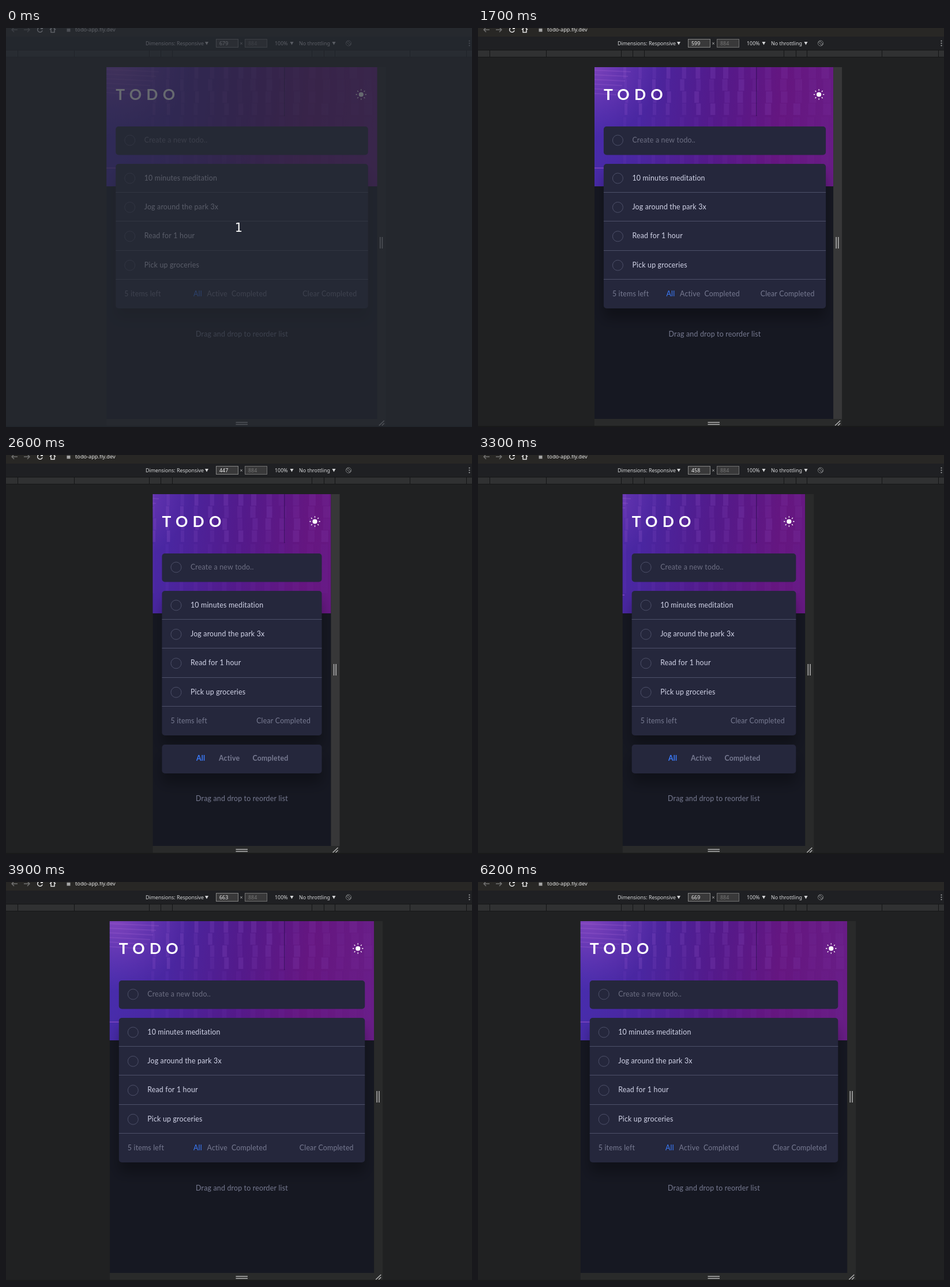
These frames come from a looping animation (808x693 px, 6.8 s). An HTML page with a canvas:

```html
<!DOCTYPE html>
<html lang="en">
<head>
<meta charset="utf-8">
<title>Todo app</title>
<style>
  html, body { margin: 0; width: 100%; height: 100%; overflow: hidden; background: #202122; }
  canvas { display: block; }
</style>
</head>
<body>
<canvas id="stage" width="808" height="693"></canvas>
<script>
const ctx = document.getElementById('stage').getContext('2d');
const LOOP = 6800, STEP = 100, SCALE = 0.6915, MID = 409;
const TOP = 68, BOTTOM = 679;
const UI = '"Noto Sans", sans-serif', APP = 'Lato, sans-serif';
const CARD = '#25273c', LINE = '#4d5069', DIM = '#777a91', TEXT = '#d2d4e8';

// Eased drags of the viewport width in css pixels
const START_WIDTH = 679;
const drags = [
  { start: 1270, time: 1075, to: 447 },
  { start: 3200, time: 700, to: 663 },
  { start: 3900, time: 100, to: 665 },
  { start: 4800, time: 200, to: 669 }
];
const ease = p => (1 - Math.cos(Math.PI * Math.min(1, Math.max(0, p)))) / 2;
const widthAt = t => Math.round(drags.reduce(
  (width, { start, time, to }) => width + (to - width) * ease((t - start) / time), START_WIDTH));

function seeded(seed) {
  return () => (seed = seed * 16807 % 2147483647) / 2147483647;
}

function rect(x, y, w, h, color) {
  ctx.fillStyle = color;
  ctx.fillRect(x, y, w, h);
}

function text(str, x, y, color, font, { align = 'left', gap = 0 } = {}) {
  ctx.font = font;
  ctx.fillStyle = color;
  ctx.textAlign = align;
  ctx.letterSpacing = gap + 'px';
  ctx.fillText(str, x, y);
}

const label = (str, x, y, color, align, weight = 400) =>
  text(str, x, y, color, `${weight} 12.4px ${APP}`, { align, gap: 0.18 });

// Each path is a flat list: x, y, x, y, ...
function lines(color, width, ...paths) {
  ctx.strokeStyle = color;
  ctx.lineWidth = width;
  ctx.beginPath();
  for (const p of paths) {
    ctx.moveTo(p[0], p[1]);
    for (let i = 2; i < p.length; i += 2) ctx.lineTo(p[i], p[i + 1]);
  }
  ctx.stroke();
}

function disc(x, y, r, color) {
  ctx.fillStyle = color;
  ctx.beginPath();
  ctx.arc(x, y, r, 0, 7);
  ctx.fill();
}

function ring(x, y, r, color, width = 1, from = 0, to = Math.PI * 2) {
  ctx.strokeStyle = color;
  ctx.lineWidth = width;
  ctx.beginPath();
  ctx.arc(x, y, r, from, to);
  ctx.stroke();
}

function card(x, y, w, h, shadow) {
  ctx.save();
  if (shadow) {
    ctx.shadowColor = 'rgba(0,0,0,.3)';
    ctx.shadowBlur = 22;
    ctx.shadowOffsetY = 18;
  }
  ctx.fillStyle = CARD;
  ctx.beginPath();
  ctx.roundRect(x, y, w, h, 5);
  ctx.fill();
  ctx.restore();
}

function browserBar() {
  const ink = '#e4e4e4';
  rect(0, 0, 808, 15, '#282725');
  lines('#737373', 1.4, [20, 3, 10, 3], [14, -1, 10, 3, 14, 7], [31, 3, 41, 3], [37, -1, 41, 3, 37, 7]);
  ring(59, 3, 4.3, ink, 1.5, 0.3, 5.4);
  rect(60, -1, 4, 3, ink);
  lines(ink, 1.5, [76, 3, 81, -2, 86, 3], [78, 2, 78, 7.5, 84, 7.5, 84, 2]);
  rect(105.5, 1, 6, 5.5, '#a5a5a5');
  text('todo-app.fly.dev', 120, 6, '#e6e6e6', '9.2px ' + UI);
}

function field(x, value, border, color) {
  rect(x, 19, 39, 15, border);
  rect(x + 1, 20, 37, 13, '#39393a');
  text(value, x + 6, 30, color, '8.9px ' + UI);
}

function menu(str, x, arrowX) {
  const ink = '#d6d7d9';
  text(str, x, 30, ink, '8.9px ' + UI);
  ctx.beginPath();
  ctx.moveTo(arrowX - 3, 24);
  ctx.lineTo(arrowX + 3, 24);
  ctx.lineTo(arrowX, 29.5);
  ctx.fill();
}

function deviceBar(width) {
  rect(0, 15, 808, 23, '#1f2023');
  menu('Dimensions: Responsive', 242, 348);
  menu('100%', 466, 495.5);
  menu('No throttling', 508, 568.5);
  field(364, width, '#858585', '#ececec');
  field(414, 884, '#707070', '#757575');
  text('×', 405.5, 30, '#b5b5b5', '8.9px ' + UI);
  ring(594, 26.5, 4.6, '#77797b');
  lines('#8a8c8e', 1, [590.5, 24.5, 592.5, 22.5, 598, 28, 596, 30, 590.5, 24.5]);
  for (const y of [22.5, 26.5, 30.5]) disc(803.5, y, 1.1, '#a5a7a9');

  rect(0, 38, 808, 13, '#161718');
  rect(0, 39, 808, 11, '#303132');
  for (const d of [121, 141.5, 161, 291, 389]) {
    rect(Math.round(MID - d), 39, 1, 11, '#131415');
    rect(Math.round(MID + d), 39, 1, 11, '#131415');
  }
}

function gradient(x0, y0, x1, y1, colors) {
  const g = ctx.createLinearGradient(x0, y0, x1, y1);
  colors.forEach((c, i) => g.addColorStop(i / (colors.length - 1), c));
  return g;
}

// The photo stays centred, so resizing only crops it.
function photo() {
  const random = seeded(11);
  rect(170, TOP, 480, 207, gradient(174, 90, 644, 150, ['#472eae', '#4a26a0', '#531a8b', '#651680', '#681d86']));
  const glow = ctx.createRadialGradient(190, 60, 0, 190, 60, 130);
  glow.addColorStop(0, 'rgba(190,95,205,.5)');
  glow.addColorStop(1, 'rgba(150,70,200,0)');
  rect(170, TOP, 240, 207, glow);

  // Window columns that widen and fade to the right, with faint reflections
  for (let i = 0; i < 16; i++) {
    const x = 252 + i * 24.5, w = 5 + i * 0.6, alpha = 0.3 - i * 0.014;
    for (let y = TOP; y < 150; y += 21)
      rect(x + random() * 4, y, w, 20, `rgba(150,90,205,${alpha * (0.4 + random() * 0.6)})`);
    rect(x, 155, w, 85, `rgba(130,70,200,${alpha * 0.35})`);
  }
  for (let i = 0; i < 6; i++)
    lines('rgba(200,130,225,.15)', 2, [174, 72 + i * 8, 265 - i * 5, 76 + i * 8]);
  rect(482, TOP, 1.5, 85, 'rgba(35,8,75,.5)');
  rect(174, 242.5, 80, 1.5, 'rgba(175,95,215,.55)');
}

function sun(x, y) {
  disc(x, y, 4.1, '#fff');
  for (let i = 0; i < 8; i++) {
    const c = Math.cos(i * Math.PI / 4), s = Math.sin(i * Math.PI / 4);
    lines('#fff', 1.3, [x + c * 6.8, y + s * 6.8, x + c * 9.2, y + s * 9.2]);
  }
}

function app(left, width) {
  const right = left + width, mid = left + width / 2;
  const x = left + 16, w = width - 32;
  const wide = width / SCALE >= 600;

  text('TODO', x, 125, '#fff', `700 26.5px ${APP}`, { gap: 8.2 });
  sun(right - 28, 115.5);

  card(x, 171, w, 49.5);
  ring(left + 40.5, 195, 9, LINE);
  label('Create a new todo..', left + 65.5, 199, '#6d6f83');

  card(x, 236, w, 251, true);
  ['10 minutes meditation', 'Jog around the park 3x', 'Read for 1 hour', 'Pick up groceries'].forEach((item, i) => {
    const y = 261 + i * 50.4;
    ring(left + 40.5, y, 9, LINE);
    label(item, left + 65.5, y + 3.5, TEXT);
    rect(x, Math.floor(285.5 + i * 50.4), w, 1, LINE);
  });
  label('5 items left', left + 31, 466, DIM);
  label('Clear Completed', right - 35.5, 466, DIM, 'right');

  if (!wide) card(x, 503, w, 50, true);
  const offsets = wide ? [-84, -60.5, -18] : [-79, -40, 18.5];
  ['All', 'Active', 'Completed'].forEach((name, i) =>
    label(name, mid + offsets[i], wide ? 466 : 531, i ? DIM : '#3b7cfd', 'left', wide ? 400 : 700));
  label('Drag and drop to reorder list', mid, wide ? 536 : 601, DIM, 'center');
}

function resizers(left, right, dragging) {
  const grip = '#b4b4b4';
  rect(left, BOTTOM, right - left + 15, 12, '#292a2a');
  rect(right, TOP, 15, BOTTOM - TOP, dragging ? '#373738' : '#292a2a');
  lines(grip, 1.5, [right + 5, 363, right + 5, 383], [right + 8.7, 363, right + 8.7, 383],
    [398.5, 685, 419, 685], [398.5, 688.5, 419, 688.5],
    [right + 3, 690.5, right + 12, 682], [right + 8, 690.5, right + 12, 686.5]);
}

function draw(t) {
  const css = widthAt(t), width = css * SCALE;
  const left = MID - width / 2, right = MID + width / 2;
  const shrinking = t >= 1400 && t < 2300;

  rect(0, 0, 808, 693, '#202122');
  browserBar();
  deviceBar(css);

  ctx.save();
  ctx.beginPath();
  ctx.rect(left, TOP, width, BOTTOM - TOP);
  ctx.clip();
  rect(left, TOP, width, BOTTOM - TOP, '#161822');
  photo();
  // Page layout trails the frame while it is being narrowed.
  app(left, width + (shrinking ? 3 : 0));
  ctx.restore();

  resizers(left, right, t >= 1400 && t < 3300);
  rect(0, 691, 808, 2, '#191a1a');

  if (t < STEP) {
    rect(0, 0, 808, 693, 'rgba(38,42,50,.7)');
    text('1', 403.5, 354, '#fff', '21px "DejaVu Sans", sans-serif', { align: 'center' });
  }
}

function tick() {
  const t = performance.now() % LOOP;
  draw(Math.floor(t / STEP) * STEP);
  requestAnimationFrame(tick);
}
tick();
</script>
</body>
</html>
```
